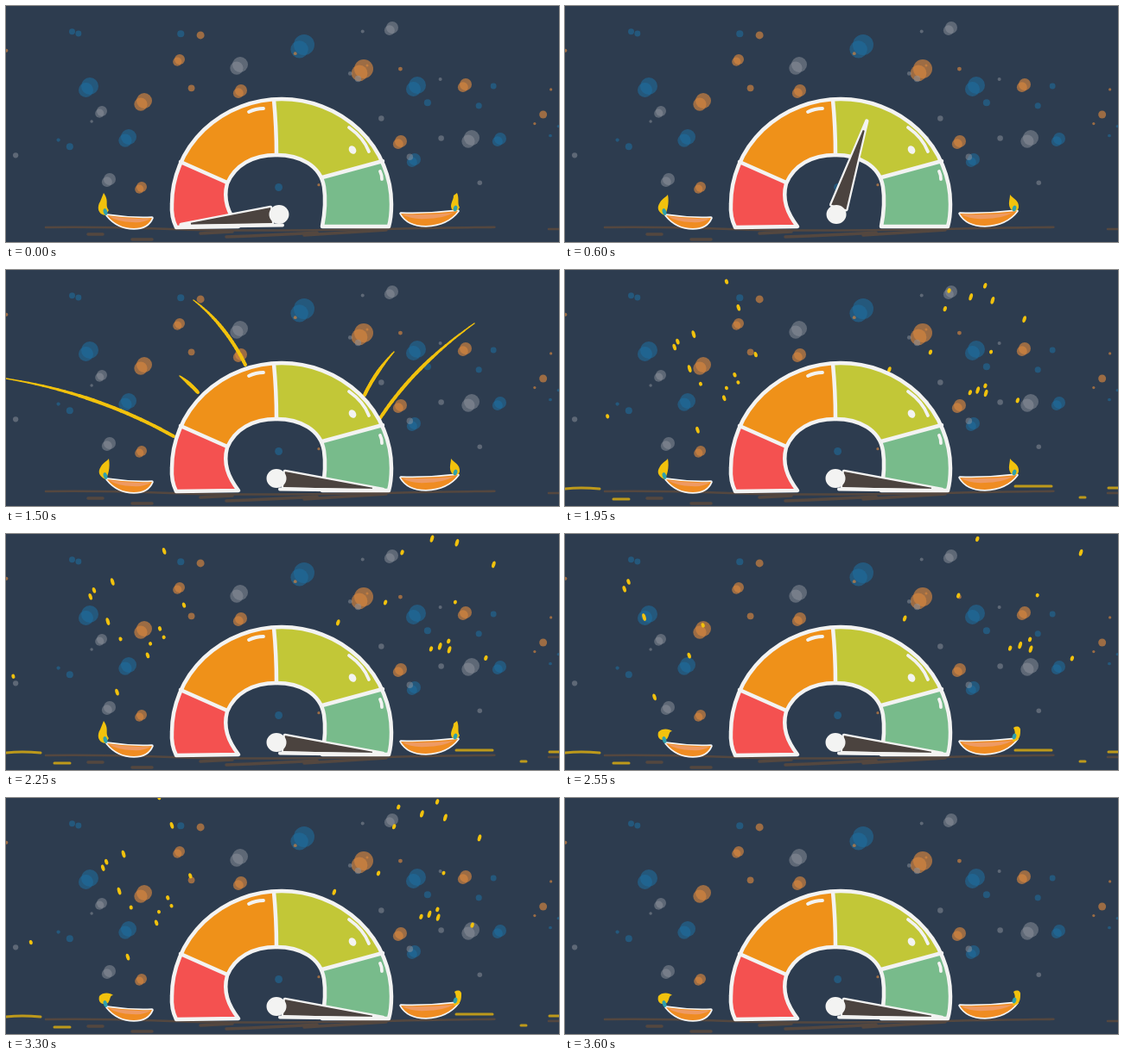
An HTML page with a canvas that plays this animation: 640 px wide and 274 px high, repeating every 3750 ms.

```html
<!DOCTYPE html>
<html lang="en">
<head>
<meta charset="utf-8">
<style>
html, body { margin: 0; width: 100%; height: 100%; overflow: hidden; background: #2d3c4f; }
canvas { display: block; width: 100vw; height: 100vh; }
</style>
</head>
<body>
<canvas id="stage" width="640" height="274"></canvas>
<script>
const ctx = document.getElementById('stage').getContext('2d');
const STEP = 150, STEPS = 25;
const WHITE = '#f3f3f2', GOLD = '#f2c20d', EMBER = '#bd991b', DARK = '#4b433f', BROWN = '#54473f', TEAL = '#2fa0ad';
const ORANGE = 'rgba(214,134,62,.66)', BLUE = 'rgba(30,110,160,.56)', GREY = 'rgba(140,146,155,.52)';

function randomFrom(seed) {
  return () => (seed = seed * 16807 % 2147483647) / 2147483647;
}

// Large lights: x, y, radius
const lights = {
  [ORANGE]: [[414, 73, 11], [160, 110, 9], [201, 62, 6], [272, 98, 7], [457, 157, 7], [157, 210, 6], [532, 91, 7]],
  [BLUE]: [[345, 45, 12], [97, 93, 10], [142, 152, 9], [476, 92, 10], [473, 178, 7], [572, 154, 7]],
  [GREY]: [[271, 68, 9], [447, 25, 7], [111, 122, 6], [120, 201, 7], [539, 153, 9]]
};

const outline = new Path2D('M197 257Q191 245 192 230A127 122 0 0 1 446 230Q446 246 443 256L366 256Q371 230 368 210C364 185 340 173 313 173C285 173 265 185 256 206C251 225 257 240 269 256Z');
const dividers = new Path2D('M202 181L256 205M310 109Q313 140 313 173M366 199L436 180');
const slices = [
  ['#f45150', 'M180 171L258 206L285 262H180Z'],
  ['#ef9119', 'M180 171L256 205L313 213Q313 140 310 100H180Z'],
  ['#c2c737', 'M310 100Q313 140 313 213L460 173V100Z'],
  ['#78bb8b', 'M313 213L460 173V262H313Z']
].map(([color, d]) => [color, new Path2D(d)]);

// Flame pairs: upright, leaning, curled
const flames = [
  'M113 217C120 227 114 231 119 237L115 243C106 242 105 233 109 227ZM522 217C525 224 522 229 525 234Q521 241 516 236C513 230 518 226 518 220Z',
  'M119 219C121 229 118 240 115 243C107 239 106 234 110 228C113 223 117 222 119 219ZM515 219C518 223 526 226 525 234C524 239 519 239 516 236C512 230 515 225 515 219Z',
  'M108 230C112 225 121 226 124 229C120 229 121 234 118 238C112 241 106 238 108 230ZM519 225C523 222 528 224 527 229C527 237 524 241 518 241C519 236 523 232 519 225Z'
].map(d => new Path2D(d));

// Quadratic curves: start, control, end
const streaks = [
  [194, 193, 105, 143, 0, 126], [277, 110, 253, 62, 217, 35], [222, 142, 212, 131, 201, 123],
  [415, 145, 428, 118, 449, 95], [433, 172, 472, 112, 542, 62]
];

function line(color, width, d) {
  ctx.strokeStyle = color;
  ctx.lineWidth = width;
  ctx.stroke(typeof d === 'string' ? new Path2D(d) : d);
}

function fill(color, d) {
  ctx.fillStyle = color;
  ctx.fill(typeof d === 'string' ? new Path2D(d) : d);
}

function ellipse(color, x, y, rx, ry = rx, tilt = 0) {
  ctx.fillStyle = color;
  ctx.beginPath();
  ctx.ellipse(x, y, rx, ry, tilt, 0, Math.PI * 2);
  ctx.fill();
}

function drawBackground() {
  ctx.fillStyle = '#2d3c4f';
  ctx.fillRect(0, 0, 640, 274);
  for (const [color, list] of Object.entries(lights))
    for (const [x, y, r] of list) {
      ellipse(color, x, y, r);
      ellipse(color, x - r * .45, y + r * .45, r * .85);
    }
  const random = randomFrom(77);
  const colors = [ORANGE, BLUE, GREY];
  for (let i = 0; i < 36; i++)
    ellipse(colors[i % 3], random() * 640, 28 + random() * 185, 1.5 + random() * 3);
  line(BROWN, 2.5, 'M46 257Q110 256 190 259T430 259T561 257M628 259H640');
  line(BROWN, 3.5, 'M95 265H112M146 271H169M255 268Q310 266 360 263M225 264L262 262M345 266L440 260');
}

function drawStreak([x0, y0, cx, cy, x1, y1], from, to) {
  const at = u => [
    (1 - u) ** 2 * x0 + 2 * u * (1 - u) * cx + u * u * x1,
    (1 - u) ** 2 * y0 + 2 * u * (1 - u) * cy + u * u * y1];
  const parts = 24, du = (to - from) / parts;
  ctx.strokeStyle = GOLD;
  for (let i = 0; i < parts; i++) {
    const u = from + du * i;
    ctx.lineWidth = 1.2 + 2.8 * Math.min(1, 2 * (to - u));
    ctx.beginPath();
    ctx.moveTo(...at(u));
    ctx.lineTo(...at(u + du));
    ctx.stroke();
  }
}

// Sparks fan out to both sides of the gauge, then drop and thin out
function drawSparks(age) {
  const random = randomFrom(4242);
  const spread = .8 + age * .066;
  const late = Math.max(0, age - 3);
  for (let i = 0; i < 28; i++) {
    const side = i % 2 ? 1 : -1;
    const angle = .1 + random() * .95;
    const reach = (130 + random() * 185) * spread;
    const length = 2 + random() * 2.5;
    if (i % 4 < late - 1) continue;
    ellipse(GOLD, 317 + side * reach * Math.cos(angle),
      200 - reach * .85 * Math.sin(angle) + late * late * 2, 2, length, side * .3);
  }
  if (age > 0) line(EMBER, 3, 'M0 254Q18 252 40 254M521 251H563M56 266H74M596 264H602M629 253H640');
}

function drawGauge() {
  ctx.save();
  ctx.clip(outline);
  for (const [color, path] of slices) fill(color, path);
  ctx.restore();
  line(WHITE, 4.5, dividers);
  line(WHITE, 4.5, outline);
  line(WHITE, 3.8, 'M281 123Q289 119 298 119M397 141Q414 153 420 169M433 192Q435 196 435 201');
  ellipse(WHITE, 401, 167, 4, 5, -.6);
}

// Counter-clockwise degrees from the right: a swing, then one bounce
function needleAngle(step) {
  if (step === 8) return 15;
  const swing = 186 - 28.5 * step + 4 * Math.sin(step * Math.PI / 2);
  return step > 8 ? -6 : Math.max(-6, swing);
}

function drawNeedle(degrees) {
  const radians = degrees * Math.PI / 180;
  const hubX = 314.5 - 1.5 * Math.cos(radians);
  const length = degrees < 0 ? 124 : 114;
  const lying = Math.abs(Math.sin(radians)) < .12;
  ctx.save();
  ctx.beginPath();
  ctx.rect(0, 0, 640, lying ? 255 : 274);
  ctx.clip();
  ctx.translate(hubX, 242);
  ctx.rotate(-radians);
  const body = new Path2D(`M9 -9L${length} 0L9 9Z`);
  line(WHITE, 4.5, body);
  fill(WHITE, body);
  fill(DARK, `M9 -9L${length * .9} -1V1L9 9Z`);
  ctx.restore();
  if (lying) line(WHITE, 4, `M${hubX + 4} 254.5L${hubX + length * Math.cos(radians)} 256`);
  ellipse(WHITE, hubX, 242, 11.5, 11);
}

function drawLamps(pose) {
  const bowls = [
    ['M117 243Q143 247 169 246Q164 258 148 258Q129 258 117 243Z', 'M119 244Q143 248 167 247Q160 252 146 251Q130 251 119 244Z'],
    ['M457 241Q490 242 523 238Q511 254 486 255Q465 255 457 241Z', 'M459 242Q490 243 518 240Q505 247 486 247Q468 248 459 242Z']
  ];
  for (const [bowl, inside] of bowls) {
    line(WHITE, 3.5, bowl);
    fill('#ef8c22', bowl);
    fill('#ee9a63', inside);
  }
  fill(GOLD, flames[pose]);
  ellipse(TEAL, 115, 239, 2.2, 4, -.3);
  ellipse(TEAL, 520, 235, 2.2, 3.5, .3);
}

function draw(step) {
  ctx.lineCap = ctx.lineJoin = 'round';
  drawBackground();
  if (step === 10) streaks.forEach(s => drawStreak(s, 0, 1));
  if (step === 11) streaks.forEach(s => drawStreak(s, .85, 1.12));
  if (step >= 12 && step <= 18) drawSparks(step - 12);
  if (step >= 20 && step <= 23) drawSparks(step - 20);
  drawGauge();
  drawNeedle(needleAngle(step));
  // The flame cycle runs backwards from its last, curled pose in the second burst
  drawLamps(step < 20 ? step % 3 : step === 24 ? 2 : (step - 20) % 3);
}

function tick() {
  draw(Math.floor(performance.now() / STEP) % STEPS);
  requestAnimationFrame(tick);
}
tick();
</script>
</body>
</html>
```
